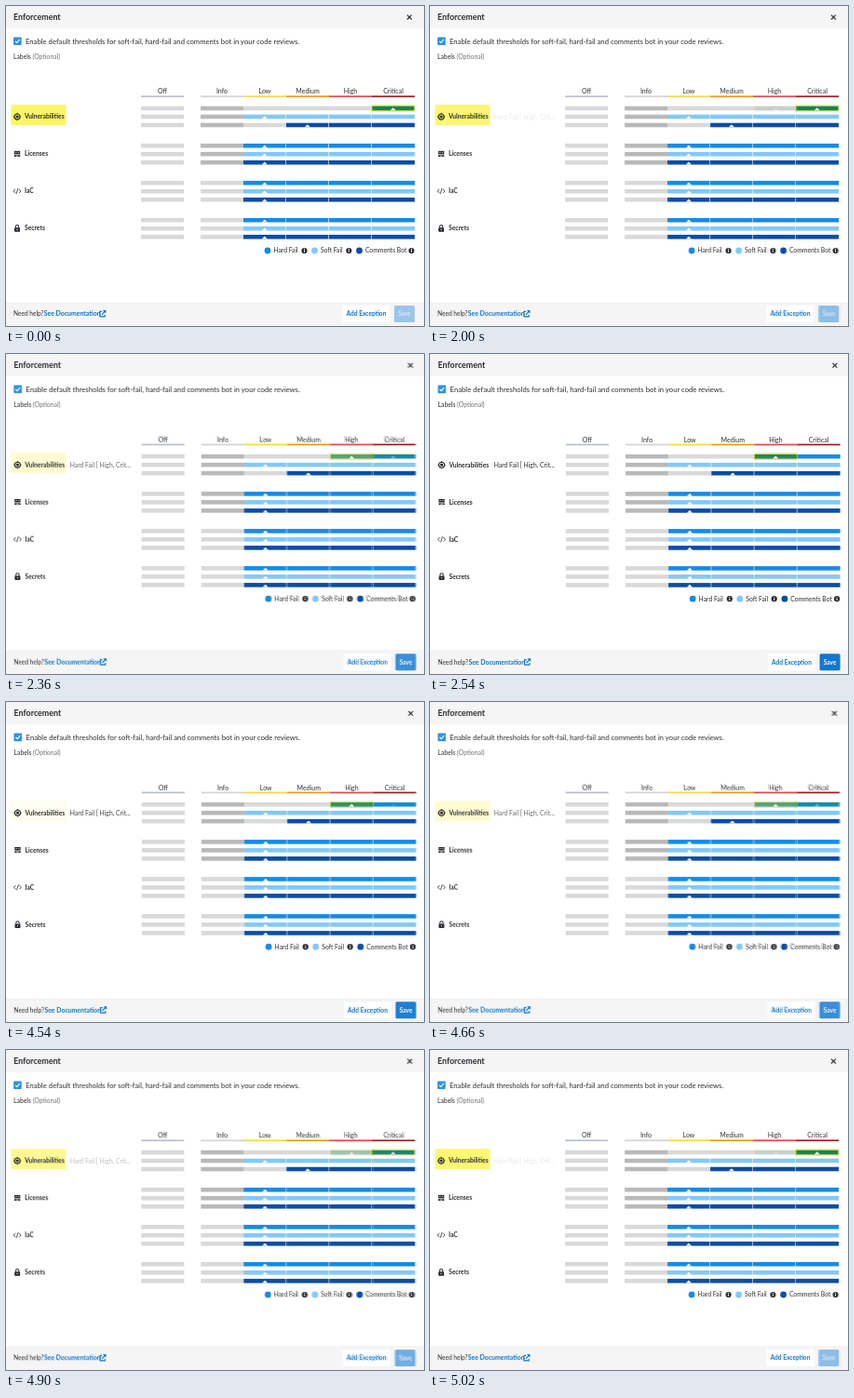
These frames come from a looping animation (449 by 344 pixels, 5080 ms). An HTML page:

```html
<!DOCTYPE html>
<html lang="en">
<head>
<meta charset="utf-8">
<title>Enforcement</title>
<style>
  html, body { margin: 0; width: 100%; height: 100%; overflow: hidden; background: #fff; }
  svg { position: absolute; left: 0; top: 0; display: block; }
  text { font-family: Lato, "Open Sans", sans-serif; font-size: 6.8px; fill: #2b2d31; white-space: pre; }
  .bold { font-weight: 700; }
  .mid { text-anchor: middle; }
  .link { fill: #1173c9; font-weight: 700; }
</style>
</head>
<body>
<script>
const W = 449, H = 344, LOOP = 5080, STEP = 60;
const HARD = '#158be9', SOFT = '#82c8fd', BOT = '#0b4da6';
const LIGHT = '#d9d9d9', DARK = '#b9b9b9', INK = '#2b2d31', BLUE = '#1173c9';

const COLUMNS = [
  ['Off', 145, '#b9bfca'], ['Info', 209, '#d4d4d4'], ['Low', 255, '#fbd54b'],
  ['Medium', 301, '#e99a1c'], ['High', 347, '#dc4a4a'], ['Critical', 393, '#9f1c20'],
];
const COL_W = 46;

const rect = (x, y, w, h, fill, extra = '') =>
  `<rect x="${x}" y="${y}" width="${w}" height="${h}" fill="${fill}" ${extra}/>`;
const circle = (x, y, r, fill, extra = '') =>
  `<circle cx="${x}" cy="${y}" r="${r}" fill="${fill}" ${extra}/>`;
const path = (d, stroke, width = 1, fill = 'none') =>
  `<path d="${d}" stroke="${stroke}" stroke-width="${width}" fill="${fill}"/>`;
const text = (x, y, str, cls = '', size = 6.8, extra = '') =>
  `<text x="${x}" y="${y}" class="${cls}" style="font-size:${size}px" ${extra}>${str}</text>`;

// One threshold bar: grey below the chosen level, coloured from it upwards.
function bar(y, level, color, infoGrey, glow) {
  const top = y - 2.3, h = 4.6;
  let out = '';
  COLUMNS.forEach(([, x], i) => {
    const on = i >= level;
    const fill = on ? color : i === 1 ? infoGrey : LIGHT;
    if (glow && i === level) {
      out += rect(x - 1, top - 1.5, COL_W + 1.4, h + 3, glow.edge, 'rx="0.8"');
      out += rect(x + 0.4, top, COL_W - 1, h, glow.fill);
    } else {
      out += rect(x, top, COL_W - (on && i < 5 ? 0.6 : 0), h, fill);
    }
  });
  const cx = COLUMNS[level][1] + COL_W / 2 - 0.2, base = top + h;
  return out + path(`M${cx - 3} ${base}L${cx} ${base - 3}L${cx + 3} ${base}Z`, 'none', 0, '#fff');
}

function icons() {
  const chip = circle(12, 119, 3, 'none', `stroke="${INK}" stroke-width="1.1"`) +
    rect(10.6, 117.6, 2.8, 2.8, INK) +
    path('M12 114.8V116M12 122V123.2M7.8 119H9M15 119H16.2', INK, 0.9);
  const license = rect(8.8, 155.8, 6.4, 3.6, INK) + rect(8.8, 160.2, 6.4, 1.8, INK) +
    path('M10 157.4H11.3M12.8 157.4H14.1M10.8 161.1H13.2', '#fff', 0.8);
  const code = path('M10 196.8L8.1 199L10 201.2M14 196.8L15.9 199L14 201.2M12.9 196L11.1 202', INK, 0.8);
  const lock = rect(9, 238.2, 6, 4.5, INK, 'rx="0.7"') +
    path('M10.3 238.4V237.2A1.7 1.7 0 0 1 13.7 237.2V238.4', INK, 1.1) + circle(12, 240.4, 0.6, '#fff');
  return chip + license + code + lock;
}

function legend() {
  const items = [[281, HARD, 'Hard Fail', 320.5], [331.5, SOFT, 'Soft Fail', 368.3], [379.5, BOT, 'Comments Bot', 435.5]];
  return items.map(([x, color, label, info]) =>
    circle(x, 263, 3.4, color) + text(x + 6.4, 265.4, label) +
    circle(info, 263, 3.1, INK) + rect(info - 0.5, 262.5, 1, 2.2, '#fff') + circle(info, 261.4, 0.55, '#fff')
  ).join('');
}

function table(s) {
  let out = COLUMNS.map(([name, x, color]) =>
    text(x + COL_W / 2, 94.4, name, 'mid', 7) + rect(x, 96.4, COL_W, 1.7, color)).join('');
  ['Vulnerabilities', 'Licenses', 'IaC', 'Secrets'].forEach((name, g) => {
    const y = 110 + 40 * g + (g ? 0.2 : 0);
    const grey = g < 2 ? DARK : LIGHT;
    out += text(20, 121.4 + 40 * g, name, 'bold', 6.7);
    out += bar(y, g ? 2 : s.level, HARD, grey, g ? null : s.glow);
    out += bar(y + 9, 2, SOFT, grey);
    out += bar(y + 18, g ? 2 : 3, BOT, grey);
  });
  return out;
}

function dialog(s) {
  const frame = rect(0, 0, W, H, '#fff') + rect(0, 0, W, 24, '#f5f5f5') + rect(0, 318, W, 26, '#f5f5f5');
  const head = text(8, 15.3, 'Enforcement', 'bold', 8.9) +
    path('M430.9 9.7L435.7 14.5M435.7 9.7L430.9 14.5', INK, 1.2) +
    rect(8, 33.4, 8.6, 8.6, '#2f93e4', 'rx="0.8"') + path('M10 37.8L11.7 39.5L14.7 35.9', '#fff', 1.1) +
    text(21, 40.5, 'Enable default thresholds for soft-fail, hard-fail and comments bot in your code reviews.', '', 7.7) +
    text(8, 56.5, 'Labels <tspan fill="#6f7277">(Optional)</tspan>');
  const foot = text(8, 333.4, 'Need help?', '', 6.6) + text(40.8, 333.4, 'See Documentation', 'link', 6.9) +
    path('M103 328.4H100.9V333.9H106.2V331.8', BLUE, 1.1) + path('M102.8 331.8L106.4 328.2', BLUE, 1.2) +
    path('M103.8 327H107.4V330.6Z', 'none', 0, BLUE) +
    rect(361.5, 322, 51, 18, '#fff', 'rx="1"') + text(387, 333.4, 'Add Exception', 'link mid', 6.6) +
    rect(417, 322, 22, 18, s.button, 'rx="1.5"') +
    text(428, 333.4, 'Save', 'bold mid', 6.6, `style="fill:${s.saveInk}"`).replace(/" style="fill/, '" fill="' + s.saveInk + '" data-c="fill').replace('class="bold mid" style="', `class="bold mid" style="fill:${s.saveInk};`);
  const mark = s.marked ? rect(5.5, 106.2, 59, 22, '#fcf565') : '';
  const note = s.note ? text(68, 121.4, s.note) : '';
  return `${frame}<g transform="${s.shift}">${head}${mark}${icons()}${table(s)}${note}${legend()}${foot}</g>`;
}

function layer(s) {
  document.body.insertAdjacentHTML('beforeend',
    `<svg width="${W}" height="${H}" viewBox="0 0 ${W} ${H}">${dialog(s)}</svg>`);
  return document.body.lastElementChild;
}

layer({
  level: 5, marked: true, shift: '', button: '#9dc5ea', saveInk: '#d5e7f7',
  glow: { edge: '#f8ec45', fill: '#148452' },
});
const edited = layer({
  level: 4, note: 'Hard Fail [ High, Crit...', shift: 'translate(.5 .2) scale(1.0025 1)',
  button: '#1277d2', saveInk: '#fff',
  glow: { edge: '#dfe96f', fill: '#23875f' },
});

// Hold, dissolve in tenths, hold, dissolve back.
const steps = [[0, 0]];
for (let k = 1; k <= 10; k++) steps.push([2000 + STEP * (k - 1), k / 10]);
for (let k = 9; k >= 1; k--) steps.push([4540 + STEP * (9 - k), k / 10]);
steps.push([LOOP, 0]);

edited.animate(
  steps.map(([t, opacity]) => ({ offset: t / LOOP, opacity, easing: 'step-end' })),
  { duration: LOOP, iterations: Infinity });
</script>
</body>
</html>
```
